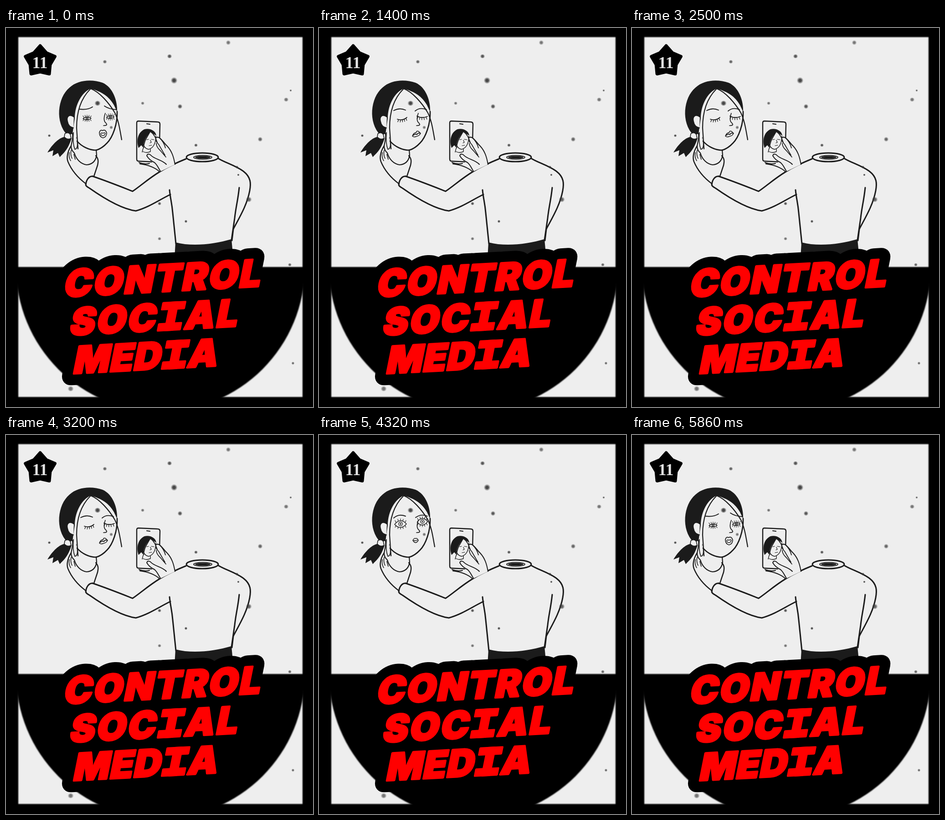
Recreate the animation shown at these times as an HTML page with a canvas. Size 674 px wide and 831 px high, loop 5.96 s.

```html
<!DOCTYPE html>
<html lang="en">
<head>
<meta charset="utf-8">
<title>Selfie card</title>
<style>
html, body { margin: 0; width: 100%; height: 100%; overflow: hidden; background: #000; }
canvas { display: block; }
</style>
</head>
<body>
<canvas id="stage" width="674" height="831"></canvas>
<script>
const stage = document.getElementById('stage');
const g = stage.getContext('2d');
const LOOP = 5960;
const PAPER = '#eeeeee';
const INK = '#1b1b1b';
const RED = '#ff0000';

// Start time of each expression
const MOODS = [[0, 'sad'], [1400, 'kiss'], [3780, 'stare'], [4760, 'rest'], [5460, 'sad']];

// x, y, radius
const SPECKS = [
  [488, 32, 4], [217, 74, 3.5], [359, 62, 4], [369, 115, 5.5], [615, 157, 4], [625, 137, 2],
  [382, 172, 4], [201, 165, 5], [300, 165, 3], [558, 244, 4], [417, 257, 3], [95, 236, 2.5],
  [231, 218, 3], [533, 376, 5], [337, 385, 3], [395, 424, 2.5], [337, 462, 3], [623, 519, 3],
  [507, 305, 2.5], [510, 322, 2], [142, 791, 5], [630, 735, 2.5]
];

function line(d, width = 3) {
  g.lineWidth = width;
  g.strokeStyle = INK;
  g.stroke(new Path2D(d));
}

function fill(d, color = INK) {
  g.fillStyle = color;
  g.fill(new Path2D(d));
}

function shape(d, width, color = PAPER) {
  fill(d, color);
  line(d, width);
}

function oval(x, y, rx, ry, color, width = 0) {
  g.beginPath();
  g.ellipse(x, y, rx, ry, 0, 0, 7);
  g.fillStyle = color;
  g.fill();
  if (width) {
    g.lineWidth = width;
    g.strokeStyle = INK;
    g.stroke();
  }
}

// Soft-edged paper with a black half disc below the horizon
function card() {
  g.fillStyle = '#000';
  g.fillRect(0, 0, 674, 831);
  g.save();
  g.filter = 'blur(1px)';
  g.fillStyle = PAPER;
  g.fillRect(27, 20, 624, 789);
  g.beginPath();
  g.arc(339, 524, 317, 0, Math.PI);
  g.fillStyle = '#000';
  g.fill();
  g.restore();
}

function badge() {
  g.beginPath();
  for (let i = 0; i < 10; i++) {
    const a = (i / 5 - 0.5) * Math.PI;
    const r = i % 2 ? 23 : 34;
    g.lineTo(75 + r * Math.cos(a), 73 + r * Math.sin(a));
  }
  g.closePath();
  g.fillStyle = g.strokeStyle = '#000';
  g.lineWidth = 7;
  g.fill();
  g.stroke();
  g.font = 'bold 36px "Liberation Serif", serif';
  g.textAlign = 'center';
  g.fillStyle = '#e4e4e4';
  g.fillText('11', 74.5, 88);
}

function specks() {
  SPECKS.forEach(([x, y, r], i) => {
    g.globalAlpha = 0.65 + (i % 4) * 0.08;
    const tall = i % 3 ? 0.8 : 1.15;
    const glow = g.createRadialGradient(x, y, r * 0.5, x, y, r * 1.35);
    glow.addColorStop(0, '#333');
    glow.addColorStop(1, 'rgba(60,60,60,0)');
    oval(x, y, r * 1.35, r * 1.35 * tall, glow);
  });
  g.globalAlpha = 1;
}

function torso() {
  line('M190 325C225 337 255 349 278 358C310 336 328 314 395 287');
  line('M175 344C176 334 181 325 190 325M175 344C176 347 179 349 183 351C220 377 255 397 285 401C314 393 336 377 361 365');
  line('M359 355C361 376 364 382 366 405L373 473');
  line('M512 350C509 379 505 390 502 417L495 465');
  line('M466 286C480 295 503 301 521 314C538 327 538 341 535 357C529 389 512 416 499 441L496 466');
  oval(431, 283.5, 35, 9.5, PAPER, 3);
  oval(432, 283.5, 20, 4, PAPER, 1.8);
  oval(432, 283.5, 17, 2.8, INK);
  fill('M372 470C410 480 456 474 495 463L499 505L370 505Z');
}

function phone() {
  shape('M291 204L333 206Q338 206 338 211L336 290Q336 294 331 294L291 292Q287 292 287 287L287 208Q287 204 291 204Z', 2.4);
  line('M309 210L316 211', 2);
  fill('M330 241C340 235 346 250 353 257C364 267 368 281 371 299L338 315L310 281L320 276L331 264Z', PAPER);
  fill('M291 263C285 244 291 228 304 222C317 219 329 226 330 236L317 228C308 238 303 246 301 262L297 257Z');
  line('M300 240C299 256 303 264 313 266C323 264 329 253 329 237', 1.5);
  line('M317 226C309 241 303 247 302 263M317 227C326 233 329 243 332 251', 1.8);
  line('M301 264L299 272M317 265L317 271Q308 275 301 271', 1.4);
  line('M309 245L313 244M319 244L325 245M317 246L319 251L316 252M314 258L320 257', 1.2);
  line('M330 240C338 236 346 252 354 259C364 270 368 282 371 299', 2);
  line('M329 241Q327 247 335 255L349 279M330 253Q330 261 339 269L351 283M336 240Q347 250 350 263', 1.7);
  line('M352 299C342 288 325 288 317 278Q311 274 309 280Q314 289 326 295C332 300 334 306 339 314', 2);
  line('M292 295Q305 300 315 297M294 298C310 300 325 304 337 315', 2);
}

function hand() {
  line('M143 258C136 270 132 282 136 293C145 315 160 330 176 342', 2.4);
  line('M197 280C203 286 203 292 201 301L193 325', 2.4);
  line('M146 231C148 242 144 250 143 259Q143 268 150 274C154 288 164 298 177 300C190 299 197 291 199 279', 2.2);
  line('M143 268Q141 278 145 286M139 273Q137 283 142 291M149 277L152 288', 1.6);
  line('M155 240Q160 265 151 266Q146 252 148 229', 1.7);
}

function head() {
  fill('M128 239C118 240 102 254 91 273L104 268L102 281L114 274L118 283C128 273 136 266 144 242Z');
  fill('M135 235C107 207 113 153 139 131C158 113 189 112 212 120C235 130 245 160 244 184L237 169C226 150 211 140 186 133C169 139 151 166 151 198L146 232Z');
  fill('M156 187C160 160 174 143 186 133C210 139 233 158 243 187C245 214 233 242 221 253Q211 265 198 268C181 267 166 260 155 246Z', PAPER);
  shape('M149 195C139 187 132 195 135 205Q137 217 148 219', 2);
  shape('M129 232Q136 227 141 233L143 242Q135 246 128 239Z', 1.6);
  line('M244 183C245 211 234 240 222 252Q211 264 198 268C183 268 166 260 156 248', 2.7);
  line('M198 267L199 279', 2.2);
  line('M185 134C164 155 155 183 155 219L158 265', 2.2);
  line('M186 133C205 140 226 164 239 186C247 202 250 223 254 245', 2.2);
}

// Closed eyelid with lashes hanging from a quadratic curve
function lid(x0, y0, cx, cy, x1, y1) {
  line(`M${x0} ${y0}Q${cx} ${cy} ${x1} ${y1}`, 1.8);
  for (let i = 0; i < 5; i++) {
    const t = 0.12 + i * 0.19, u = 1 - t;
    const x = u * u * x0 + 2 * u * t * cx + t * t * x1;
    const y = u * u * y0 + 2 * u * t * cy + t * t * y1;
    line(`M${x} ${y}l${(t - 0.5) * 5} 5`, 1.3);
  }
}

function openEye(x, y, rx, ry, iris) {
  line(`M${x - rx} ${y + 1}Q${x} ${y - ry * 2} ${x + rx} ${y}Q${x} ${y + ry * 2} ${x - rx} ${y + 1}Z`, 1.4);
  oval(x, y, iris, iris, PAPER, 1.3);
  oval(x, y, iris * 0.4, iris * 0.4, INK);
  for (let i = -2; i <= 2; i++) {
    const px = x + i * rx * 0.38, h = ry * (1 - i * i * 0.13);
    line(`M${px} ${y - h}l${i * 1.1} -4M${px} ${y + h}l${i} 4`, 1.1);
  }
}

function smallMouth(x, y) {
  line(`M${x - 6} ${y}Q${x - 3} ${y - 6} ${x} ${y - 4}Q${x + 4} ${y - 6} ${x + 6} ${y}Q${x} ${y + 10} ${x - 6} ${y}M${x - 4} ${y}Q${x} ${y + 2} ${x + 4} ${y - 1}`, 1.5);
}

const FACES = {
  sad() {
    line('M162 178Q179 180 190 173M216 171Q226 178 242 179', 2);
    openEye(178, 198, 9, 3.2, 2.4);
    openEye(229, 195, 8.5, 3.2, 2.4);
    line('M205 229Q207 222 212 225Q218 221 221 230Q221 239 213 241Q205 239 205 229Z', 1.7);
    line('M208 231Q211 229 213 231Q216 228 218 231Q216 237 212 236Q208 235 208 231Z', 1.4);
  },
  kiss() {
    line('M164 181Q177 174 190 180M211 182Q221 173 236 179', 1.9);
    lid(172, 200, 184, 204, 193, 196);
    lid(215, 193, 225, 199, 238, 194);
    line('M205 237Q208 229 213 230Q214 224 219 227L223 231Q220 237 213 238Q208 240 205 237ZM206 236Q212 231 215 234Q217 229 222 231', 1.6);
  },
  stare() {
    line('M164 182Q175 172 190 178M212 181Q224 172 238 178', 1.9);
    openEye(179, 195, 13, 7.5, 4.2);
    openEye(227, 190, 11.5, 7.2, 4);
    smallMouth(212, 231);
  },
  rest() {
    line('M164 182Q176 173 190 179M211 181Q222 173 237 179', 1.9);
    lid(167, 200, 181, 207, 193, 197);
    lid(215, 194, 225, 201, 239, 194);
    smallMouth(212, 231);
  }
};

function face(mood) {
  line('M218 187Q212 203 220 209Q224 214 214 214', 1.7);
  FACES[mood]();
}

// word, x, baseline, tracking
const SIZE = 83;
const LINES = [['CONTROL', 124, 590, 3], ['SOCIAL', 137, 674, 3.5], ['MEDIA', 145, 758, 1]];

function titleLine([word, x, y, gap], color, width) {
  g.save();
  g.setTransform(1, -0.054, -0.2, 1, x, y);
  g.font = `900 ${SIZE}px Inter, Roboto, sans-serif`;
  g.textAlign = 'left';
  g.fillStyle = g.strokeStyle = color;
  g.lineWidth = width;
  let pen = 0;
  for (const ch of word) {
    const w = g.measureText(ch).width;
    const slab = ch === 'I';
    const adv = slab ? SIZE * 0.68 : w;
    const at = pen + (adv - w) / 2;
    g.fillText(ch, at, 0);
    g.strokeText(ch, at, 0);
    if (slab) {
      for (const top of [-SIZE * 0.727, -14]) {
        g.fillRect(pen + 4, top, adv - 8, 14);
        g.strokeRect(pen + 4, top, adv - 8, 14);
      }
    }
    pen += adv + gap;
  }
  g.restore();
}

function title() {
  LINES.forEach(l => titleLine(l, '#000', 51));
  LINES.forEach(l => titleLine(l, RED, 4.5));
}

function draw(ms) {
  const mood = MOODS.filter(m => m[0] <= ms).pop()[1];
  g.lineCap = g.lineJoin = 'round';
  card();
  badge();
  torso();
  phone();
  hand();
  head();
  face(mood);
  specks();
  title();
}

const start = performance.now();
function tick() {
  draw((performance.now() - start) % LOOP);
  requestAnimationFrame(tick);
}
tick();
</script>
</body>
</html>
```
